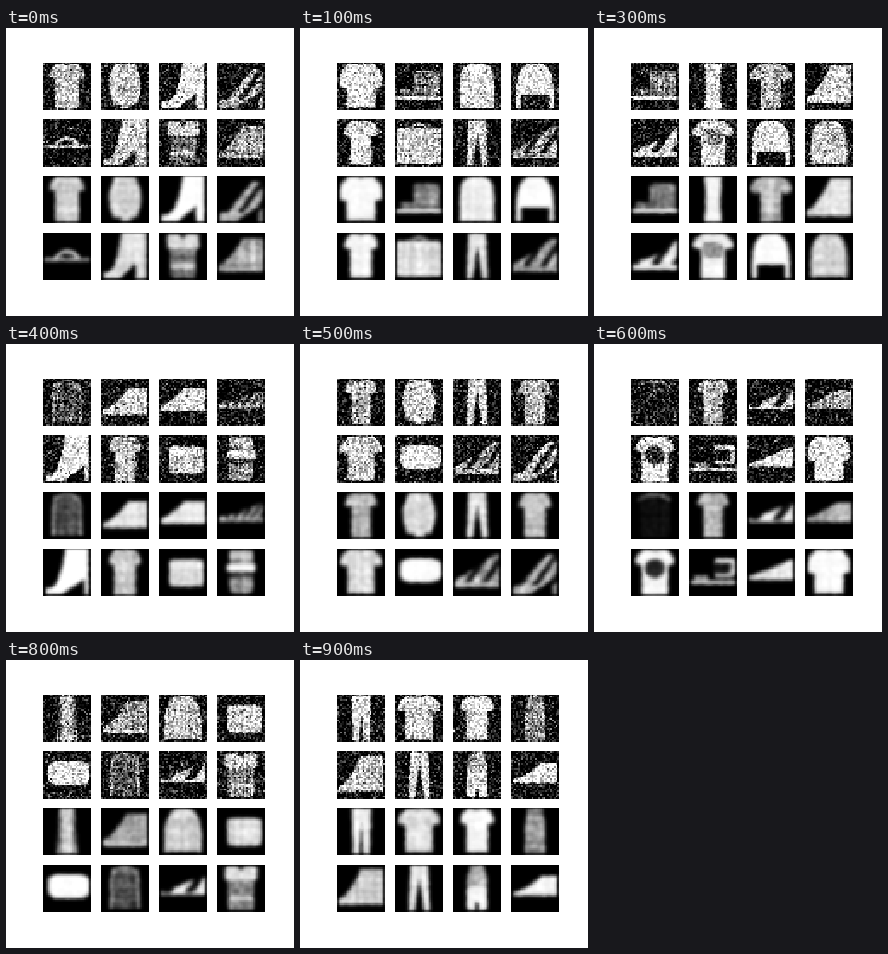
Write a matplotlib script that moves like this. It is 288x288 px and loops after 1.1 s.

```python
import random

import matplotlib.pyplot as plt
import numpy as np
from matplotlib.animation import FuncAnimation

CELLS, SUB = 28, 4
NOISE = 0.24
axis = (np.arange(CELLS * SUB) + 0.5) / SUB
X, Y = np.meshgrid(axis, axis)


# Every helper returns a list of (mask, shade) layers on the fine grid.
def box(shade, cx, cy, rx, ry, power=8):
    return [((abs(X - cx) / rx) ** power + (abs(Y - cy) / ry) ** power < 1, shade)]


def disc(shade, cx, cy, rx, ry):
    return box(shade, cx, cy, rx, ry, power=2)


def arch(shade, cx, base, rx, ry, thick=1.4):
    outer, inner = (((X - cx) / (rx - d)) ** 2 + ((Y - base) / (ry - d)) ** 2
                    for d in (0, thick))
    return [((outer < 1) & (inner > 1) & (Y < base), shade)]


def column(shade, upper, lower, bulge=0, top=0.5, bottom=27.5):
    t = (Y - top) / (bottom - top)
    limit = upper + (lower - upper) * t + bulge * np.sin(np.pi * t)
    return [((abs(X - 14) < limit) & (t > 0) & (t < 1), shade)]


def shoulders(width, slope):
    return 4 + (width - 4) * (1 - np.exp(-np.maximum(Y - 1, 0) / slope))


def tee(shade, sleeve, drop, body, hem=27.5):
    x = abs(X - 14)
    arms = (x < shoulders(sleeve, 2)) & (Y < drop - 0.3 * np.maximum(x - sleeve + 3, 0))
    torso = (x < body) & (Y < hem)
    return [((Y > 1) & (arms | torso), shade)] + disc(0.4 * shade, 14, 0.8, 2.5, 1)


def pullover(shade, width, body, hem, cuff):
    x, outer = abs(X - 14), shoulders(width, 4)
    sleeves = (x < outer) & (x > outer - 2.7) & (Y < cuff)
    torso = (x < np.where(Y < 10, outer, body)) & (Y < hem)
    return [((Y > 1) & (sleeves | torso), shade)]


def coat(shade, width, bottom=27):
    return [((abs(X - 14) < shoulders(width, 2.5)) & (Y > 1) & (Y < bottom), shade)]


def edges(shade, half, top=4, bottom=27):
    outer = half - 1.5 * np.exp(-(Y - top) / 4)
    return [((abs(abs(X - 14) - outer) < 0.9) & (Y > top) & (Y < bottom), shade)]


def trousers(shade, hip, foot, gap):
    x, t = abs(X - 14.2), Y / CELLS
    inside = gap * (Y - 8) / 20
    return [((x < hip + (foot - hip) * t) & (x > inside) & (Y > 0.5) & (Y < 27.5), shade)]


def instep(toe, shaft, top, power):
    rise = np.clip((X - 1) / (shaft - 1), 0, 1) ** power
    return toe + (top - toe) * rise


def shoe(shade, toe, shaft, top, sole, power=1.6):
    return [((X > 1) & (X < 27) & (Y > instep(toe, shaft, top, power)) & (Y < sole), shade)]


def heeled(shade, shaft, block, top=0, power=3.5):
    heel = 26.5 - block
    sole = np.where(X > heel, 27.5, 27 - 9 * np.clip((X - 11) / (heel - 11), 0, 1))
    upper = instep(23.5, shaft, top, power)
    return [((X > 1.5) & (X < 26.5) & (Y > upper) & (Y < sole), shade)]


def straps(base, sole, pitch=6.0):
    """Cut slanted openings into a shoe above its sole."""
    mask, _ = base[0]
    gaps = np.sin((X + 0.7 * Y) * 2 * np.pi / pitch) > 0.3
    return base + [(mask & gaps & (Y < sole), 0.06)]


sheet_a = [
    tee(.8, 10.5, 9.5, 6.7),
    column(.82, 6, 7, 3, top=1, bottom=24.5) + box(.8, 14.5, 25, 3, 2),
    heeled(.96, 14, 5),
    straps(heeled(.72, 21, 2, top=4, power=1.2), 22, 9),
    box(.8, 14, 16, 13.5, .8) + arch(.85, 14, 15.5, 7, 5, 2),
    heeled(.85, 12, 6),
    box(.45, 14, 18, 7.5, 9) + box(.85, 14, 5.5, 9.5, 4.3)
    + disc(.2, 14, 2, 2, 1.5) + box(.85, 14, 20, 7, 1.2),
    shoe(.62, 19, 15, 4, 22.5) + box(.8, 14, 22, 13, .9),
]

sheet_b = [
    trousers(.88, 6, 5, 1.6),
    pullover(.94, 9.8, 7.5, 19, 27),
    column(.8, 4, 6) + edges(.4, 4.3, top=6),
    coat(.93, 11.2),
    column(.78, 4.8, 7.2, -2),
    shoe(.78, 18, 17, 6, 21.5, 1.2) + box(.92, 14, 21.5, 13, 1),
    pullover(.45, 9, 6, 20, 27) + edges(.65, 8.5, top=7),
    box(.95, 15, 13, 12, 7, power=4),
]

sheet_c = [
    box(.5, 18.5, 12.5, 7.5, 7.5) + box(.4, 9, 18, 6, 2) + box(.97, 14, 21, 13.5, 1),
    column(.92, 5.2, 5.2, -1),
    tee(.66, 12, 10.5, 6) + box(.92, 14, 14, .7, 12),
    shoe(.84, 20.5, 15, 2, 24),
    straps(shoe(.9, 17, 24, 5, 22, 2.2), 19, 12),
    tee(.9, 12, 10, 7) + box(.5, 14, 10.5, 5.5, 4.5),
    pullover(.95, 11, 8.5, 19, 27),
    pullover(.8, 10.8, 8, 26, 26.5),
]

sheet_d = [
    box(.3, 14, 14, 7, 12) + edges(.58, 8, top=3, bottom=26) + arch(.5, 14, 5, 6, 4),
    shoe(.87, 18.5, 16, 6, 21.5),
    shoe(.88, 16.5, 15, 6, 19, 1.3),
    straps(shoe(.55, 15, 26, 7, 18, 1.5), 16, 5),
    heeled(.98, 13, 2.2),
    tee(.76, 9.5, 10, 6.2),
    box(.84, 16, 14.5, 10, 8),
    box(.55, 14, 14, 7, 12.5) + box(.2, 14, 15.5, 7, 2)
    + box(.95, 14, 11.5, 8.5, 2.2) + box(.7, 14, 4, 7, 2.5),
]

sheet_e = [
    box(.06, 14, 14, 8.5, 13) + arch(.55, 13.5, 6, 9.5, 4.5),
    tee(.68, 9.5, 9, 5.6),
    straps(shoe(.88, 16, 25, 7, 18, 1.2), 17, 13),
    shoe(.68, 16, 19, 7, 18, 1.1),
    tee(.93, 11.5, 10, 7.5) + disc(.15, 14, 12, 5.8, 5.5),
    box(.78, 14, 20, 13.5, 1) + box(.82, 21, 11.5, 6, 5.5)
    + box(.06, 19.5, 11.8, 5, 3.2) + box(.5, 7, 17.5, 4, 1.3),
    shoe(.85, 16.5, 25, 7, 18.5, 1.2),
    tee(.94, 12.3, 15, 8.6, 26.5),
]

sheet_f = [
    pullover(.96, 10.3, 6.6, 26, 25),
    straps(shoe(.62, 19, 24, 4, 23, 1.1), 20, 10),
    shoe(.95, 16.5, 20, 8.5, 18.5, 1.2),
    column(.68, 8.5, 11, top=13.5) + arch(.72, 14, 14, 5, 13.5, 1.5),
    box(.84, 14, 15.5, 13, 10.5, 14) + arch(.7, 14, 5.5, 5, 3),
    pullover(.4, 9.5, 6.5, 26, 26) + edges(.85, 9, top=2),
    pullover(.88, 9.8, 6.8, 22, 27),
    coat(.9, 10),
]

sheet_g = [
    trousers(.92, 5.5, 4.8, 1.2),
    tee(.84, 12.5, 10.5, 7.8, 26.5),
    tee(.92, 10, 10, 6.2, 26.5),
    column(.5, 4.6, 5.2, -.6) + edges(.65, 5),
    shoe(.78, 20.5, 14, 3, 23.5),
    trousers(.88, 5, 6.2, 3),
    column(.68, 3.5, 5.5, 1, bottom=14) + box(.93, 14, 20, 6, 7)
    + box(.1, 14, 25, 1, 2.5),
    shoe(.93, 16.5, 18, 7, 18.5),
]


def rasterize(layers):
    fine = np.zeros(X.shape)
    for mask, shade in layers:
        fine[mask] = shade
    return fine.reshape(CELLS, SUB, CELLS, SUB).mean(axis=(1, 3))


def soften(image):
    pad = np.pad(image, 1)
    rows = (pad[:-2] + 2 * pad[1:-1] + pad[2:]) / 4
    return (rows[:, :-2] + 2 * rows[:, 1:-1] + rows[:, 2:]) / 4


def noisy_and_restored(layers, rng):
    clean = rasterize(layers)
    # Dimmer cloth shows stronger folds.
    folds = (rng.random((CELLS, 1)) + rng.random((1, CELLS)) + rng.random(clean.shape)) / 3
    cloth = clean * (1 + 1.5 * (1 - clean) * (1 - 2 * folds))
    noisy = cloth + NOISE * rng.standard_normal(clean.shape)
    smears = soften(soften(rng.random(clean.shape))) - 0.5
    restored = soften(soften(cloth)) * (1.04 + 1.6 * (1 - clean) * smears)
    return np.clip(noisy, 0, 1), np.clip(restored, 0, 1)


def render(sheet, seed):
    rng = np.random.default_rng(seed)
    pairs = [noisy_and_restored(layers, rng) for layers in sheet]
    return [p[0] for p in pairs] + [p[1] for p in pairs]


wardrobe = sheet_a + sheet_b + sheet_c + sheet_d + sheet_e + sheet_f + sheet_g
picker = random.Random(5)
mixes = [picker.sample(wardrobe, 8) for _ in range(3)]
order = [sheet_a, mixes[0], sheet_b, sheet_c, sheet_d, mixes[1],
         sheet_e, sheet_f, mixes[2], sheet_g]
batches = [render(sheet, seed) for seed, sheet in enumerate(order)]

fig, axes = plt.subplots(4, 4, figsize=(4, 4), dpi=72, facecolor="white")
fig.subplots_adjust(left=0.125, right=0.9, bottom=0.125, top=0.88, wspace=0.2, hspace=0.2)
tiles = []
for ax, image in zip(axes.flat, batches[0]):
    ax.axis("off")
    tiles.append(ax.imshow(image, cmap="gray", vmin=0, vmax=1, interpolation="nearest"))


def update(step):
    # The last batch is held for two steps.
    for tile, image in zip(tiles, batches[min(step, len(batches) - 1)]):
        tile.set_data(image)
    return tiles


anim = FuncAnimation(fig, update, frames=11, interval=100, repeat=True)
plt.show()
```
